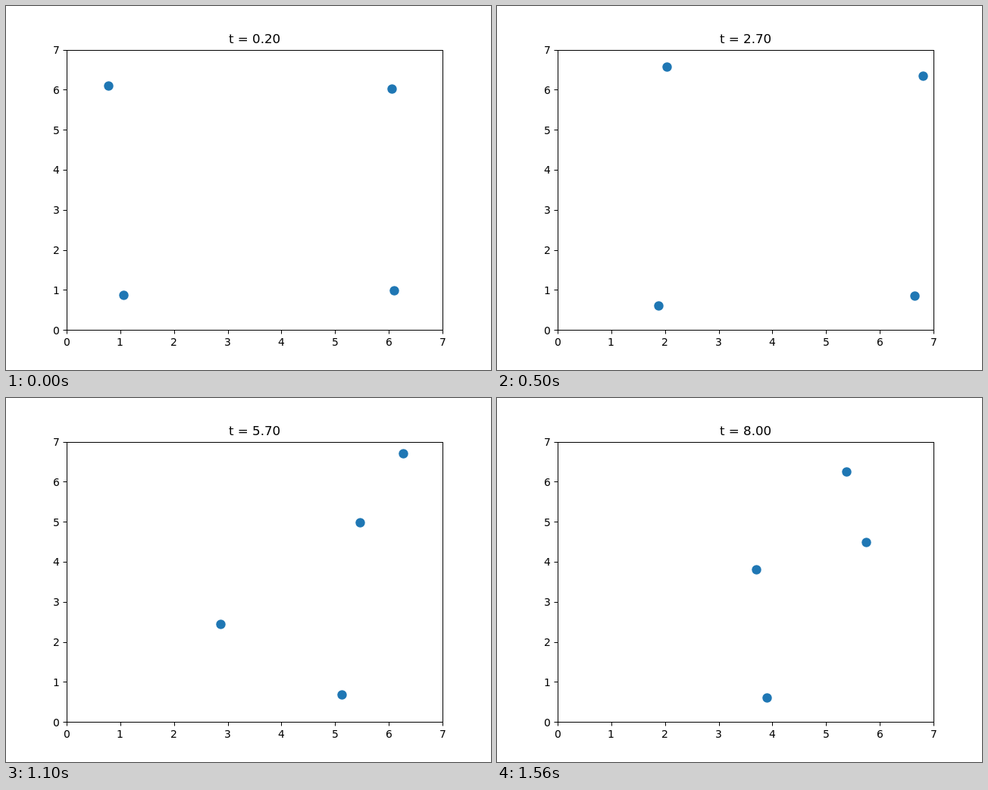
An HTML page for the animation above (1580 ms loop, 640x480 px).

```html
<!DOCTYPE html>
<html lang="en">
<head>
<meta charset="utf-8">
<title>Particles in a box</title>
<style>
  html, body { margin: 0; width: 100%; height: 100%; overflow: hidden; background: #fff; }
  svg { display: block; width: 640px; height: 480px; }
  text { font: 13.889px "DejaVu Sans", sans-serif; }
  #title { font-size: 16.667px; }
  #axes { fill: none; stroke: #000; }
  #dots { fill: #1f77b4; }
</style>
</head>
<body>
<svg viewBox="0 0 640 480">
  <clipPath id="plot"><rect x="80" y="58" width="496" height="369"/></clipPath>
  <g id="dots" clip-path="url(#plot)"></g>
  <g id="axes"><rect x="80.5" y="58.5" width="496" height="369"/></g>
  <g id="labels"></g>
  <text id="title" x="294" y="49">t = 0.20</text>
</svg>
<script>
const SIZE = 7, DT = 0.1;
const FRAME_MS = 20, FRAMES = 79, FIRST_STEP = 2;

const $ = id => document.getElementById(id);
const toX = x => 80 + x * 496 / SIZE;
const toY = y => 427.2 - y * 369.6 / SIZE;
const pixel = v => Math.round(v) + 0.5;

function add(parent, tag, attrs, text = '') {
  const el = document.createElementNS('http://www.w3.org/2000/svg', tag);
  for (const key in attrs) el.setAttribute(key, attrs[key]);
  el.textContent = text;
  return parent.appendChild(el);
}

// Axis ticks and their labels
for (let i = 0; i <= SIZE; i++) {
  const x = toX(i), y = toY(i);
  add($('axes'), 'path', { d: `M${pixel(x)} 427.5v5M80.5 ${pixel(y)}h-5` });
  add($('labels'), 'text', { x: Math.round(x - 4.42), y: 448 }, i);
  add($('labels'), 'text', { x: 62, y: Math.round(y + 5.4) }, i);
}

// Lennard-Jones particles, one near each corner of the box
const particles = [
  { x: 1, y: 1, vx: 0.3257, vy: -0.6105 },
  { x: 1, y: 6, vx: -1.129, vy: 0.5379 },
  { x: 6, y: 1, vx: 0.5055, vy: -0.0568 },
  { x: 6, y: 6, vx: 0.2992, vy: 0.1301 }
];

function attract(a, b) {
  const dx = b.x - a.x, dy = b.y - a.y;
  const r2 = dx * dx + dy * dy, s6 = r2 ** -3;
  const kick = DT * 24 * (s6 - 2 * s6 * s6) / r2;
  a.vx += kick * dx;
  a.vy += kick * dy;
  b.vx -= kick * dx;
  b.vy -= kick * dy;
}

// Moves along one axis; a particle past a wall is put on it and turned back.
function move(p, pos, vel) {
  const next = p[pos] + p[vel] * DT;
  p[pos] = Math.min(SIZE, Math.max(0, next));
  if (p[pos] !== next) p[vel] = -p[vel];
}

function step() {
  particles.forEach((a, i) => particles.slice(i + 1).forEach(b => attract(a, b)));
  for (const p of particles) {
    move(p, 'x', 'vx');
    move(p, 'y', 'vy');
  }
}

const history = Array.from({ length: FRAMES + FIRST_STEP }, () => {
  const places = particles.map(({ x, y }) => ({ cx: pixel(toX(x)), cy: pixel(toY(y)) }));
  step();
  return places;
});

const dots = particles.map(() => add($('dots'), 'circle', { r: 6.25 }));

function draw(ms) {
  const n = FIRST_STEP + Math.floor(ms / FRAME_MS) % FRAMES;
  dots.forEach((dot, i) => {
    dot.setAttribute('cx', history[n][i].cx);
    dot.setAttribute('cy', history[n][i].cy);
  });
  $('title').textContent = `t = ${(n * DT).toFixed(2)}`;
}

const start = performance.now();
function loop() {
  draw(performance.now() - start);
  requestAnimationFrame(loop);
}
loop();
</script>
</body>
</html>
```
